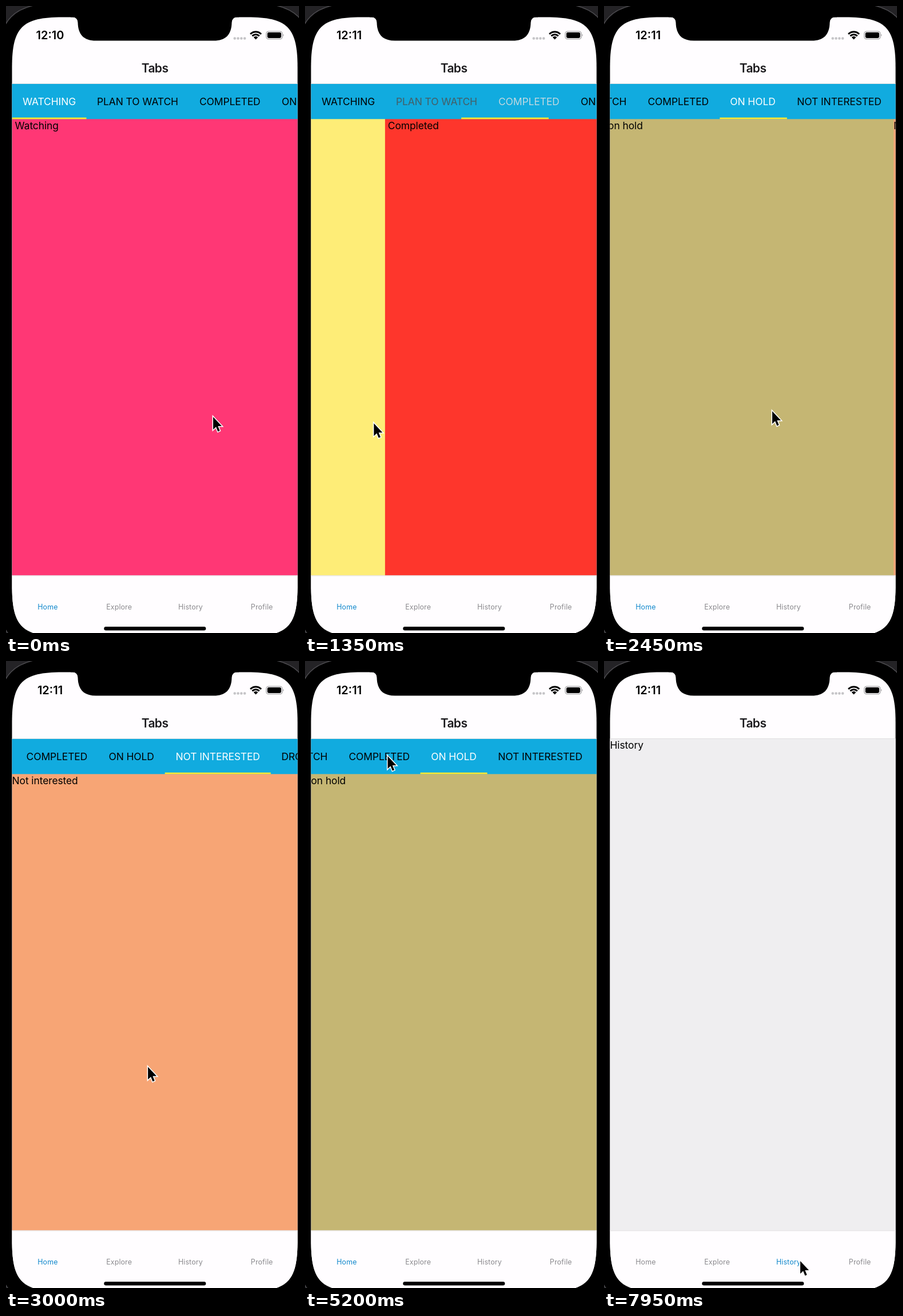
An HTML page for the animation above (8000 ms loop, 512 px wide and 1094 px high).

```html
<!DOCTYPE html>
<html lang="en">
<head>
<meta charset="utf-8">
<title>Tabs</title>
<style>
html, body { margin: 0; width: 100%; height: 100%; overflow: hidden; background: #242326; }
svg { display: block; width: 100%; height: 100%; }
text { font-family: Inter, Roboto, sans-serif; }
.mid { text-anchor: middle; }
.tab, .body { font-size: 17.4px; letter-spacing: -.07px; }
.nav { font-size: 12.4px; letter-spacing: .14px; }
.clock { font-size: 20px; font-weight: 600; }
.title { font-size: 21px; font-weight: 600; letter-spacing: -.6px; fill: #1c1b1e; }
</style>
</head>
<body>
<svg viewBox="0 0 512 1094" preserveAspectRatio="none">
  <defs>
    <clipPath id="screen"><path id="glass"/></clipPath>
    <clipPath id="wifi"><path d="M436.5 58.5 L423 45 V38 H450 V45 Z"/></clipPath>
  </defs>
  <rect width="512" height="1094" fill="#242326"/>
  <path id="bezel" stroke="#4b4a4e" stroke-width="1.5"/>
  <g clip-path="url(#screen)">
    <rect width="512" height="1110" fill="#fffdff"/>
    <rect y="135" width="512" height="1" fill="#e0dfe1"/>
    <g id="home">
      <g id="pages"></g>
      <rect y="136" width="512" height="61.3" fill="#11abdf"/>
      <g id="bar"><rect id="line" y="194.6" height="2.7" fill="#fbe830"/></g>
    </g>
    <g id="plain">
      <rect y="136" width="512" height="858" fill="#efeef0"/>
      <text id="plainText" class="body" x="10.5" y="153"></text>
    </g>
    <rect y="993.5" width="512" height="120" fill="#fffdff"/>
    <rect y="993.5" width="512" height="1" fill="#dddcde"/>
    <g id="nav"></g>
  </g>
  <path d="M113 18 V19.5 H116 Q125 19.5 125.5 29 C126 50 136 60.5 157 60.5 H363 C384 60.5 394 50 394.5 29 Q395 19.5 404 19.5 H407 V18 Z"/>
  <text id="clock" class="clock mid" x="77" y="58.3"></text>
  <text class="title mid" x="260" y="115.5">Tabs</text>
  <path d="M399.7 56.5 H418" stroke="#c5c4c7" stroke-width="4.6" stroke-linecap="round" stroke-dasharray="0 5.8"/>
  <g clip-path="url(#wifi)" fill="none" stroke="#000" stroke-width="3">
    <circle cx="436.5" cy="58" r="13"/>
    <circle cx="436.5" cy="58" r="8.3"/>
    <circle cx="436.5" cy="58" r="2.5" stroke-width="5"/>
  </g>
  <rect x="454.8" y="44.2" width="28" height="13.6" rx="4" fill="none" stroke="#8f8e91" stroke-width="1.1"/>
  <rect x="456.7" y="46" width="24.2" height="10" rx="2.4"/>
  <path d="M484.3 48.8 Q486.4 51 484.3 53.2 Z" fill="#8f8e91"/>
  <rect x="171.3" y="1083" width="178" height="6.4" rx="3.2"/>
  <g id="cursor">
    <path d="M0 -1 V21 L5 16.3 L8.3 24.4 L11.6 23 L8.3 15 H15 Z"
      stroke="#fff" stroke-width="3" paint-order="stroke"/>
  </g>
</svg>
<script>
const LOOP = 8000, STEP = 50, LEFT = 10.5, WIDTH = 499;
const DRAG = 220, SWIPE = 450, SLIDE = 350, SCROLL = 300, REACH = 214;

// tab label, tab width, page text, text indent, page colour
const TABS = [
  ['WATCHING', 130, 'Watching', 5, '#ff3775'],
  ['PLAN TO WATCH', 179, 'plan to watch', 0, '#feed77'],
  ['COMPLETED', 143.5, 'Completed', 5, '#fe362c'],
  ['ON HOLD', 117, 'on hold', 0, '#c5b673'],
  ['NOT INTERESTED', 185, 'Not interested', 0, '#f7a575'],
  ['DROPPED', 119, 'Dropped', 0, '#a33675']
];
const NAV = ['Home', 'Explore', 'History', 'Profile'];

// each swipe goes one tab on: time, then where the pointer presses
const SWIPES = [[100, 362, 718], [1050, 320, 731], [1750, 300, 706], [2428, 300, 708], [3250, 345, 710]];
// taps on the tab bar: time, tab
const TAPS = [[4228, 3], [5520, 2]];
// pointer stops after the swipes
const STOPS = [
  [4100, 144.5, 167], [5600, 144.5, 167], [6100, 306, 931],
  [6500, 230, 1064], [6900, 200, 1050], [7400, 200, 1050], [7800, 343, 1048]
];

const moves = [
  ...SWIPES.map(([start], i) => ({ start, dur: SWIPE, to: i + 1 })),
  ...TAPS.map(([start, to]) => ({ start, dur: SLIDE, to }))
];
const path = [
  ...SWIPES.flatMap(([t, x, y]) => [[t, x, y], [t + DRAG, x - REACH, y]]),
  ...STOPS
];

const $ = id => document.getElementById(id);
const clamp = v => Math.max(0, Math.min(1, v));
const ease = v => (v = clamp(v), v * v * (3 - 2 * v));
const mix = (a, b, k) => a + (b - a) * k;
const shift = (el, x, y = 0) => el.setAttribute('transform', `translate(${x} ${y})`);
const show = (el, on) => el.setAttribute('display', on ? 'inline' : 'none');

function add(parent, tag, attrs, text) {
  const el = document.createElementNS('http://www.w3.org/2000/svg', tag);
  for (const k in attrs) el.setAttribute(k, attrs[k]);
  if (text) el.textContent = text;
  return parent.appendChild(el);
}

// rectangle with continuous corners that begin at distance a
function squircle(x, y, w, h, a) {
  const c = a * .2, d = a - c;
  return `M${x + a} ${y} h${w - 2 * a} c${d} 0 ${a} ${c} ${a} ${a} v${h - 2 * a} c0 ${d} ${-c} ${a} ${-a} ${a}` +
    ` h${2 * a - w} c${-d} 0 ${-a} ${-c} ${-a} ${-a} v${2 * a - h} c0 ${-d} ${c} ${-a} ${a} ${-a} Z`;
}
$('glass').setAttribute('d', squircle(LEFT, 19.5, WIDTH, 1080.5, 88));
$('bezel').setAttribute('d', squircle(-16, -6.5, 552, 1133, 126));

let total = 0;
const tabs = TABS.map(([label, w, text, indent, color]) => {
  const x = total;
  total += w;
  const page = add($('pages'), 'g', {});
  add(page, 'rect', { y: 197, width: WIDTH + .3, height: 797, fill: color });
  add(page, 'text', { class: 'body', x: indent, y: 214.7 }, text);
  const at = { class: 'tab mid', x: x + w / 2, y: 173 };
  const dark = add($('bar'), 'text', at, label);
  const light = add($('bar'), 'text', { ...at, fill: '#fff' }, label);
  return { x, w, page, dark, light };
});
const scrollTo = tabs.map(t =>
  Math.max(0, Math.min(total - WIDTH, t.x + t.w / 2 - WIDTH / 2)));
const nav = NAV.map((label, i) => add($('nav'), 'text',
  { class: 'nav mid', x: LEFT + WIDTH * (i + .5) / 4, y: 1053 }, label));

function pointerAt(t) {
  const n = path.findIndex(p => p[0] > t);
  if (n < 1) return path.at(n).slice(1);
  const [t0, x0, y0] = path[n - 1], [t1, x1, y1] = path[n];
  const k = ease((t - t0) / (t1 - t0));
  return [mix(x0, x1, k), mix(y0, y1, k)];
}

function drawTabs(t) {
  let from = 0, to = 0, p = 0, scroll = 0;
  for (const m of moves) {
    if (t < m.start) break;
    [from, to] = [to, m.to];
    p = ease((t - m.start) / m.dur);
    scroll = mix(scrollTo[from], scrollTo[to], ease((t - m.start - m.dur) / SCROLL));
  }
  if (p === 1) [from, p] = [to, 0];
  const dir = Math.sign(to - from);
  const pos = from + dir * p;

  tabs.forEach((tab, i) => {
    show(tab.page, i === from || i === to);
    if (i === from) shift(tab.page, LEFT - dir * p * WIDTH);
    else if (i === to) shift(tab.page, LEFT + dir * (1 - p) * WIDTH);
    const on = clamp(1 - Math.abs(pos - i));
    tab.dark.setAttribute('opacity', 1 - on);
    tab.light.setAttribute('opacity', on);
  });
  const a = tabs[from], b = tabs[from + dir];
  $('line').setAttribute('x', mix(a.x, b.x, p));
  $('line').setAttribute('width', mix(a.w, b.w, p));
  shift($('bar'), LEFT - scroll);
}

function draw(t) {
  const section = t < 7000 ? 0 : t < 7850 ? 1 : 2;
  drawTabs(t);
  show($('home'), section === 0);
  show($('plain'), section > 0);
  $('plainText').textContent = NAV[section];
  nav.forEach((el, i) => el.setAttribute('fill', i === section ? '#1288cc' : '#8b8a8e'));
  $('clock').textContent = t < 400 ? '12:10' : '12:11';
  shift($('cursor'), ...pointerAt(t));
}

const begin = performance.now();
function tick() {
  const t = (performance.now() - begin) % LOOP;
  draw(Math.floor(t / STEP) * STEP);
  requestAnimationFrame(tick);
}
tick();
</script>
</body>
</html>
```
